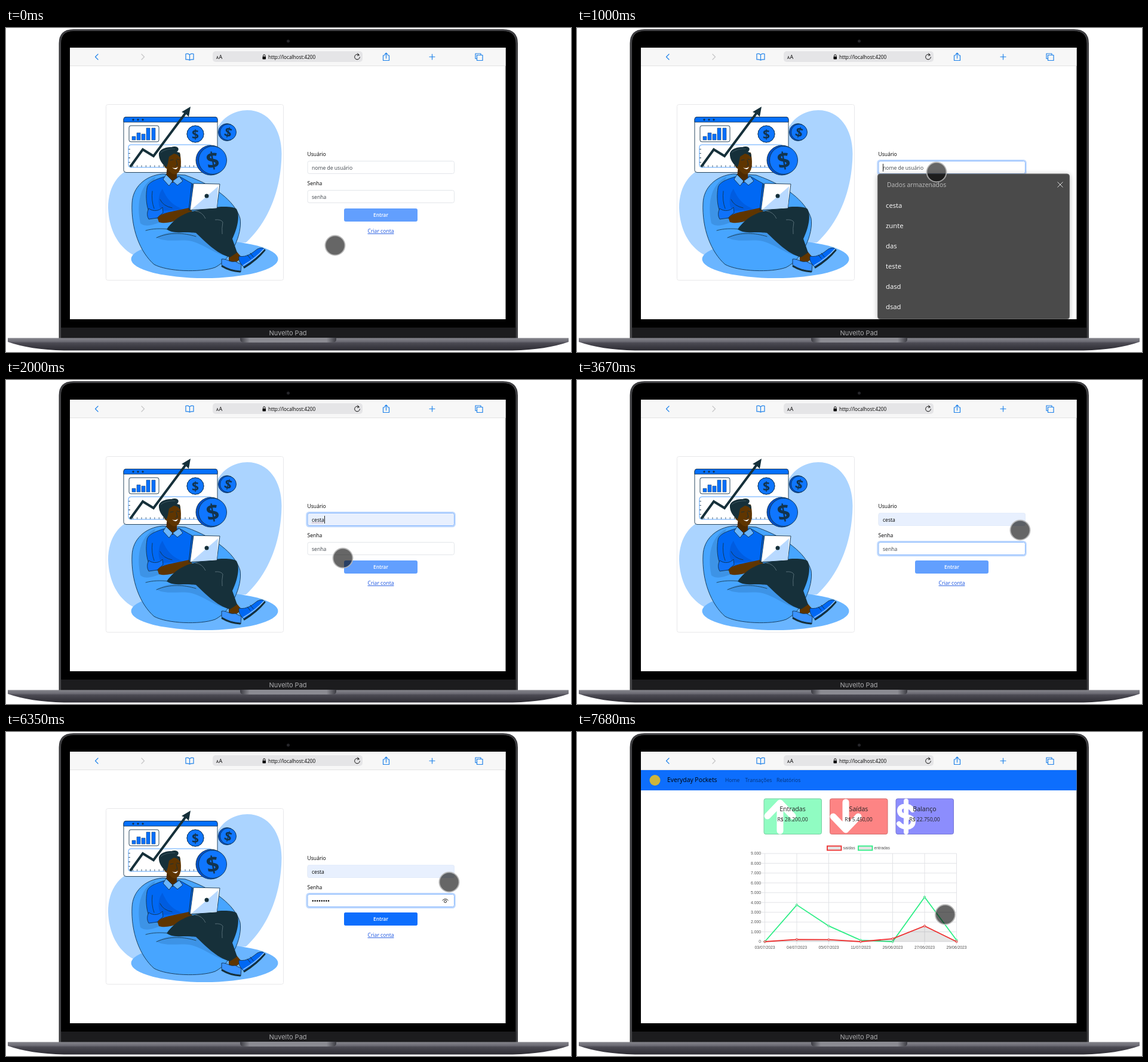
An HTML page that plays this animation: 946 px wide and 544 px high, repeating every 8 s.

```html
<!DOCTYPE html>
<html lang="pt">
<head>
<meta charset="utf-8">
<title>Login</title>
<style>
html, body { margin: 0; width: 100%; height: 100%; overflow: hidden; background: #fff; }
svg { display: block; width: 946px; height: 544px; font: 8.6px "Open Sans", "Noto Sans", sans-serif; }
.mid { text-anchor: middle; }
.line { fill: none; stroke: #16303a; stroke-linecap: round; stroke-linejoin: round; }
.icon { fill: none; stroke: #1f82ea; stroke-width: 1.2; stroke-linecap: round; stroke-linejoin: round; }
.ink { stroke: #12344f; stroke-width: .9; stroke-linejoin: round; }
.ring { fill: none; stroke: #bfd9fe; stroke-width: 2.6; }
.focus { stroke: #86b7fe; }
.chart { font: 6.8px "Liberation Sans", Arial, sans-serif; fill: #555; }
</style>
</head>
<body>
<svg viewBox="0 0 946 544">
<defs>
  <linearGradient id="base" x1="0" y1="0" x2="0" y2="1">
    <stop offset="0" stop-color="#85858c"/><stop offset=".28" stop-color="#6c6b74"/>
    <stop offset=".4" stop-color="#4b4a53"/><stop offset="1" stop-color="#2d2c33"/>
  </linearGradient>
  <linearGradient id="notch">
    <stop offset="0" stop-color="#3b3b42"/><stop offset=".1" stop-color="#8b8b92"/>
    <stop offset=".9" stop-color="#8b8b92"/><stop offset="1" stop-color="#3b3b42"/>
  </linearGradient>
  <clipPath id="screen"><path d="M107 33H836.500V489H107Z"/></clipPath>
  <filter id="shade" x="-10%" y="-10%" width="120%" height="120%"><feGaussianBlur stdDeviation="4"/></filter>
</defs>

<!-- laptop -->
<path d="M88.500 521V26Q88.500 2 113 2H832Q857 2 857 26V521Z" fill="#3a3a3d"/>
<path d="M91.500 521V26Q91.500 4.500 113 4.500H832Q854 4.500 854 26V521Z" stroke="#606064" stroke-width=".8"/>
<path d="M92 503H853.500V521H92Z" fill="#1c1c1e"/>
<circle cx="472.500" cy="22" r="2.500" fill="#26262a"/>
<text class="mid" x="472" y="516" fill="#acacae" style="font:11px Inter,sans-serif">Nuvelto Pad</text>
<path d="M3 520.500H942V527Q905 540 848 541.500H97Q40 540 3 527Z" fill="url(#base)"/>
<path d="M392 520H553V523Q553 528 546 528H399Q392 528 392 523Z" fill="url(#notch)"/>

<g clip-path="url(#screen)">
<path d="M107 33H837V489H107Z" fill="#fff"/>

<!-- browser bar -->
<path d="M107 33H837V63H107Z" fill="#f7f7f7"/>
<path d="M107 63.500H837" stroke="#e2e2e2"/>
<path class="icon" d="M154 44L149.500 48.500L154 53M709 48.500H718M713.500 44V53"/>
<path class="icon" d="M227 44L231.500 48.500L227 53" style="stroke:#c4c4c6"/>
<path class="icon" d="M307.500 45V54Q305 52.500 301 53V43.500Q305.500 42.500 307.500 45Q309.500 42.500 314 43.500V53Q310 52.500 307.500 54"/>
<path class="icon" d="M634 46H631.500V54.500H641.500V46H639M636.500 51V42M634 44.500L636.500 42L639 44.500"/>
<path class="icon" d="M788.500 51.500H786V43H795V45.500M788.500 45.500H798V54.500H788.500Z"/>
<rect x="346" y="39" width="251" height="18" rx="5" fill="#e5e5e7"/>
<text x="352" y="52" font-size="6.500">A</text><text x="356.500" y="52" font-size="9">A</text>
<rect x="429.500" y="48" width="5.500" height="4.500" rx=".7"/>
<path d="M430.700 48V46.300A1.600 1.600 0 0 1 433.900 46.300V48" fill="none" stroke="#000"/>
<text x="439" y="51.800" font-size="8.200">http://localhost:4200</text>
<path d="M591 45.500A4.300 4.300 0 1 0 592.300 48.500M588.500 42.500L591.500 45.500L588 46.500" fill="none" stroke="#111"/>

<!-- login page -->
<g data-on="0-7680">
  <rect x="167.500" y="128.500" width="297" height="295" rx="3" fill="#fff" stroke="#e8e8ea"/>
  <path d="M171 302C171 276 180 254 199 241L352 172C361 150 383 138 404 138C440 138 461.500 170 461.500 211C461 270 440 325 402 360L213 381C186 366 172 336 171 302Z" fill="#abd4ff"/>
  <ellipse cx="332.500" cy="388" rx="123" ry="32" fill="#6ab5ff"/>

  <!-- chart window -->
  <rect class="ink" x="197" y="149.500" width="157" height="93" rx="4" fill="#fff"/>
  <path class="ink" d="M197 158V153Q197 149.500 201 149.500H350Q354 149.500 354 153V158Z" fill="#0570ff"/>
  <g fill="#12344f"><circle cx="213" cy="154" r="1.700"/><circle cx="221" cy="154" r="1.700"/><circle cx="229" cy="154" r="1.700"/></g>
  <rect class="ink" x="206" y="164" width="50" height="27" rx="3" fill="#fff"/>
  <path d="M211 188V182H217V188ZM219 188V176H225V188ZM227 188V178H233V188ZM235 188V168H241V188ZM244 188V168H250V188Z" fill="#0570ff" stroke="#12344f" stroke-width=".5"/>
  <rect x="205" y="196" width="139" height="38" rx="4" fill="#fff" stroke="#2f8eff" stroke-width=".8"/>
  <path d="M212 232H343" stroke="#12344f" stroke-width="3" stroke-dasharray=".8 6.500"/>
  <path d="M206.500 203V230" stroke="#12344f" stroke-width="3" stroke-dasharray=".8 6.500"/>
  <g id="coins"></g>
  <path class="line" d="M208 233L229 204L247 215L302 141" stroke-width="4" style="stroke-linecap:butt;stroke-linejoin:miter"/>
  <path d="M309 132L306 149L301 144L294 141Z" fill="#16303a"/>

  <!-- bean bag -->
  <path class="ink" d="M262 245C232 248 212 268 211 294C209 336 224 376 248 397C270 409 325 411 350 402C378 388 396 345 392 320C386 298 360 268 300 247Z" fill="#47a5ff"/>
  <path d="M250 250C224 262 218 295 225 328C234 335 245 331 258 326L245 265ZM252 352C266 343 282 341 300 340L322 341L374 383C352 383 333 362 306 357C285 355 268 360 252 352Z" fill="#3d93e6"/>
  <path class="line" d="M234 340C258 333 285 340 312 343M252 352C275 342 298 344 318 350" stroke-width=".8"/>

  <!-- person -->
  <path class="ink" d="M264 250C248 255 237 260 236 269C233 287 236 310 246 318L270 322L310 306L313 262L290 249Z" fill="#0068f4"/>
  <path d="M262 270C255 278 252 300 262 307L300 305C280 300 269 287 262 270Z" fill="#005ce0"/>
  <path class="ink" d="M239 303C247 309 257 307 262 301L263 310L253 319L239 321Q234 313 239 303Z" fill="#0f72fa"/>
  <path class="line" d="M245 274Q243 290 248 303M258 288Q263 299 278 302" stroke-width=".8"/>
  <path d="M270 230H286V253L279 260L268 251Z" fill="#4d2a00"/>
  <path class="ink" d="M268 246L279 257L290 249L296 257L287 264L279 257L273 265L263 254Z" fill="#6ab5ff"/>
  <path d="M267 212L291 209C294 223 294 237 288 243C282 249 276 244 271 237C264 235 261 226 267 225Z" fill="#5f3500"/>
  <path d="M269 234C262 230 255 220 256 210C259 201 271 200 277 200C288 196 292 204 286 208C293 209 292 215 291 217C288 213 285 211 281 211L273 216L271 227Z" fill="#16303a"/>
  <path d="M259 209Q269 202 283 203" fill="none" stroke="#49626c" stroke-width=".7"/>
  <path d="M278 234Q283 237 288 233Q285 241 278 234Z" fill="#fff"/>
  <path class="line" d="M275 222L280 221M286 220L290 221M285 222L287 230L284 231" stroke-width=".9"/>
  <path d="M254 320C255 311 275 309 306 302L313 309C296 320 272 331 256 326Z" fill="#5f3500"/>
  <path d="M373 382L386 375L395 386L383 395L373 392Z" fill="#5f3500"/>
  <path d="M269 338C283 318 303 308 322 306C347 299 380 298 386 304C392 315 388 335 379 354L387 377L375 385C352 379 333 358 318 344C300 341 282 347 269 338Z" fill="#16303a"/>
  <path d="M317 307Q329 309 334 320M350 322Q360 321 363 326Q361 337 362 346" fill="none" stroke="#5d747d" stroke-width=".9"/>
  <path class="ink" d="M314 261L358 262L353 303L308 306Z" fill="#fff"/>
  <path d="M355 266L353 302L309 306Z" fill="#b8d9ff"/>
  <path d="M311 262L306 306L353 303" class="line" stroke-width="1"/>
  <circle cx="336" cy="282" r="3.500" fill="#16303a"/>
  <path class="ink" d="M390 383C404 386 414 376 421 371Q430 367 433 372L424 384L399 402Q388 393 390 383Z" fill="#0068f4"/>
  <path class="line" d="M433 373Q420 389 399 402" stroke-width="3"/>
  <path d="M432 371Q419 386 397 399" fill="none" stroke="#8ec5ff" stroke-width="1.500"/>
  <path class="line" d="M409 378L414 384M404 381L409 387" stroke-width=".9"/>
  <path class="ink" d="M361 388C370 387 374 394 384 392L394 397L393 409Q374 407 361 398Z" fill="#3b93ff"/>
  <path class="line" d="M362 400Q375 408 392 409" stroke-width="3"/>

  <!-- form -->
  <text x="504.500" y="214.500">Usuário</text>
  <text x="504.500" y="263.500">Senha</text>
  <rect class="ring" x="503.500" y="222.300" width="248" height="23.600" rx="4" data-on="1000-2340"/>
  <rect x="505" y="223.500" width="245.500" height="21" rx="3" fill="#fff" stroke="#e3e6ea"/>
  <rect class="focus" x="505" y="223.500" width="245.500" height="21" rx="3" fill="#fff" data-on="1000-2340"/>
  <rect x="505" y="223.500" width="245.500" height="21" rx="3" fill="#e8f0fe" stroke="#e3ecfb" data-on="1670-7680"/>
  <rect class="focus" x="505" y="223.500" width="245.500" height="21" rx="3" fill="none" data-on="1670-2670"/>
  <text x="512" y="237.500" fill="#3e444a" data-on="0-1670">nome de usuário</text>
  <text x="512" y="237.500" data-on="1670-7680">cesta</text>
  <path d="M512 239.800H532" stroke="#b07070" stroke-width=".8" stroke-dasharray="1.500 1" data-on="2000-2340"/>
  <path d="M512.500 228V241" stroke="#222" data-on="1000-1340"/>
  <path d="M533.500 228V241" stroke="#222" data-on="2000-2340"/>

  <rect class="ring" x="503.500" y="271.300" width="248" height="23.600" rx="4" data-on="3010-7350"/>
  <rect x="505" y="272.500" width="245.500" height="21" rx="3" fill="#fff" stroke="#e3e6ea"/>
  <rect class="focus" x="505" y="272.500" width="245.500" height="21" rx="3" fill="#fff" data-on="3010-7350"/>
  <rect x="505" y="272.500" width="245.500" height="21" rx="3" fill="#fff" stroke="#d3dfef" data-on="7350-7680"/>
  <text x="512" y="286.500" fill="#3e444a" data-on="0-4010">senha</text>
  <g id="dots"></g>
  <path id="caret" d="M512.500 277V289.500" stroke="#222" data-on="3010-3670 4010-6350 7010-7350"/>
  <g fill="none" stroke="#222" data-on="4010-7350"><path d="M730.500 283Q735.500 277.500 740.500 283"/><circle cx="735.500" cy="284.500" r="2"/></g>

  <rect x="566" y="303" width="123" height="22" rx="3" fill="#629ffe"/>
  <rect x="566" y="303" width="123" height="22" rx="3" fill="#0d6efd" data-on="4010-7350"/>
  <rect x="566" y="303" width="123" height="22" rx="3" fill="#0b59cf" data-on="7350-7680"/>
  <text class="mid" x="627.500" y="317" fill="#fff" font-weight="600" font-size="8.300">Entrar</text>
  <text class="mid" x="627.500" y="344" fill="#1551e0" text-decoration="underline">Criar conta</text>

  <!-- stored entries -->
  <g data-on="1000-2000">
    <rect x="503" y="246" width="322" height="244" rx="4" opacity=".28" filter="url(#shade)"/>
    <rect x="503.500" y="245" width="321" height="243.500" rx="4" fill="#4a4a4a" stroke="#6a6a6a"/>
    <rect x="506" y="281" width="314" height="33" rx="3" fill="#5d5d5d" data-on="1670-2000"/>
    <text x="519" y="267" fill="#bebebe" font-size="10.350">Dados armazenados</text>
    <path d="M804.500 258.500L813.500 267.500M813.500 258.500L804.500 267.500" stroke="#ddd"/>
    <g id="entries" fill="#fff" font-size="11.300" font-weight="500"></g>
  </g>
</g>

<!-- dashboard -->
<g data-on="7680-8000">
  <path d="M107 64H837V98H107Z" fill="#0d6efd"/>
  <circle cx="130.500" cy="81" r="9" fill="#cdb53c"/>
  <text x="151" y="84" font-size="10.400">Everyday Pockets</text>
  <g fill="#06357b"><text x="248" y="84">Home</text><text x="281.500" y="84">Transações</text><text x="334" y="84">Relatórios</text></g>
  <g id="cards"></g>
  <g fill="none" stroke="#fff" stroke-width="11" stroke-linecap="round" stroke-linejoin="round">
    <path d="M340 120V166M319 141L340 119L361 141"/>
    <path d="M450 118V163M429 142L450 164L471 142"/>
    <path d="M562 131C556 122 540 122 540 132C540 146 563 138 563 151C562 163 545 162 539 154M551 116V168" stroke-width="8"/>
  </g>
  <g id="cardText"></g>
  <g id="chart" class="chart"></g>
</g>

<g id="cursor"><circle r="16.300" opacity=".6"/><circle r="16.500" fill="none" stroke="#b4b4b4" stroke-opacity=".85" stroke-width="2"/></g>
</g>
</svg>
<script>
const $ = id => document.getElementById(id);

const coin = (x, y, r, turn, depth) => `
  <circle class="ink" cx="${x - depth}" cy="${y}" r="${r}" fill="#0050c8"/>
  <circle class="ink" cx="${x + depth}" cy="${y}" r="${r - depth}" fill="#0f76ff"/>
  <text class="mid" transform="translate(${x + depth} ${y}) rotate(${turn})" y="${r * .54}"
    font-size="${r * 1.5}" font-weight="700" fill="#12344f">$</text>`;
$('coins').innerHTML = coin(317, 178, 14, 0, 0) + coin(371, 175, 14.5, 15, 1) + coin(344.5, 222, 25, -10, 1.5);

$('entries').innerHTML = ['cesta', 'zunte', 'das', 'teste', 'dasd', 'dsad']
  .map((s, i) => `<text x="517" y="${302 + 34 * i}">${s}</text>`).join('');

const keyTimes = [4010, 4340, 4340, 4680, 5010, 5340, 5680, 5680];
const keyStep = 3.75;
$('dots').innerHTML = keyTimes.map((t, i) =>
  `<circle cx="${513.8 + i * keyStep}" cy="283.5" r="1.2" data-on="${t}-7680"/>`).join('');

const cards = [
  ['Entradas', '28.200,00', '#90fcc2', '#78cfa1', 361], ['Saídas', '5.450,00', '#fd8484', '#d36f6f', 471.5],
  ['Balanço', '22.750,00', '#8c8dfd', '#7677d4', 582]];
$('cards').innerHTML = cards.map(([, , fill, edge, x]) =>
  `<rect x="${x - 48}" y="112" width="96.5" height="59.5" rx="3" fill="${fill}" stroke="${edge}"/>`).join('');
$('cardText').innerHTML = cards.map(([name, sum, , , x]) =>
  `<text class="mid" x="${x}" y="133" font-size="10.6" font-weight="500" fill="#222">${name}</text>
   <text class="mid" x="${x}" y="149.500" fill="#222">R$ ${sum}</text>`).join('');

function drawChart() {
  const px = i => 314.5 + i * 53.5, py = v => 352 - v * 148 / 9000;
  let out = '';
  for (let k = 0; k <= 9; k++) {
    const y = py(k * 1000);
    out += `<path d="M309 ${y}H635.5" stroke="#dfe0e5" stroke-width=".9"/>
      <text x="308" y="${y + 2.3}" text-anchor="end">${k ? k + '.000' : 0}</text>`;
  }
  ['03/07', '04/07', '05/07', '11/07', '26/06', '27/06', '29/06'].forEach((d, i) => {
    out += `<path d="M${px(i)} 204V357" stroke="#dfe0e5" stroke-width=".9"/>
      <text class="mid" x="${px(i)}" y="364">${d}/2023</text>`;
  });
  const series = (values, color, area) => {
    const points = values.map((v, i) => [px(i), py(v)]);
    if (area) out += `<polygon points="${points.join(' ')}" fill="#000" opacity=".1"/>`;
    out += `<polyline points="${points.join(' ')}" fill="none" stroke="${color}" stroke-width="1.8"/>`;
    for (const [x, y] of points) out += `<circle cx="${x}" cy="${y}" r="1.6" fill="#ddd" stroke="${color}"/>`;
  };
  series([0, 3750, 1600, 150, 0, 4550, 150], '#2eee86', false);
  series([0, 220, 200, 0, 300, 1600, 0], '#ee2f2f', true);
  [[419, '#ee2f2f', 'saídas'], [471, '#2eee86', 'entradas']].forEach(([x, color, name]) => {
    out += `<rect x="${x}" y="191.5" width="23.5" height="7" fill="#e4e4e4" stroke="${color}" stroke-width="1.8"/>
      <text x="${x + 26.5}" y="197.3">${name}</text>`;
  });
  $('chart').innerHTML = out;
}
drawChart();

// time, x, y
const path = [[0, 551, 365], [670, 572, 322], [1000, 602, 242], [1340, 582, 279], [1670, 564, 297],
  [2000, 564, 299], [2340, 564, 297], [2670, 564, 293], [3010, 564, 288], [3340, 742, 252],
  [6680, 702, 259], [7010, 630, 302], [7350, 616.5, 306.5]];

const timed = [...document.querySelectorAll('[data-on]')].map(el =>
  [el, el.dataset.on.split(' ').map(span => span.split('-').map(Number))]);

function draw(now) {
  const t = now % 8000;
  for (const [el, spans] of timed)
    el.style.display = spans.some(([a, b]) => t >= a && t < b) ? '' : 'none';
  const [, x, y] = path.filter(p => p[0] <= t).pop();
  $('cursor').setAttribute('transform', `translate(${x} ${y})`);
  const typed = keyTimes.filter(k => k <= t).length;
  $('caret').setAttribute('transform', `translate(${typed * keyStep} 0)`);
}

const start = performance.now();
function tick() {
  draw(performance.now() - start);
  requestAnimationFrame(tick);
}
tick();
</script>
</body>
</html>
```
